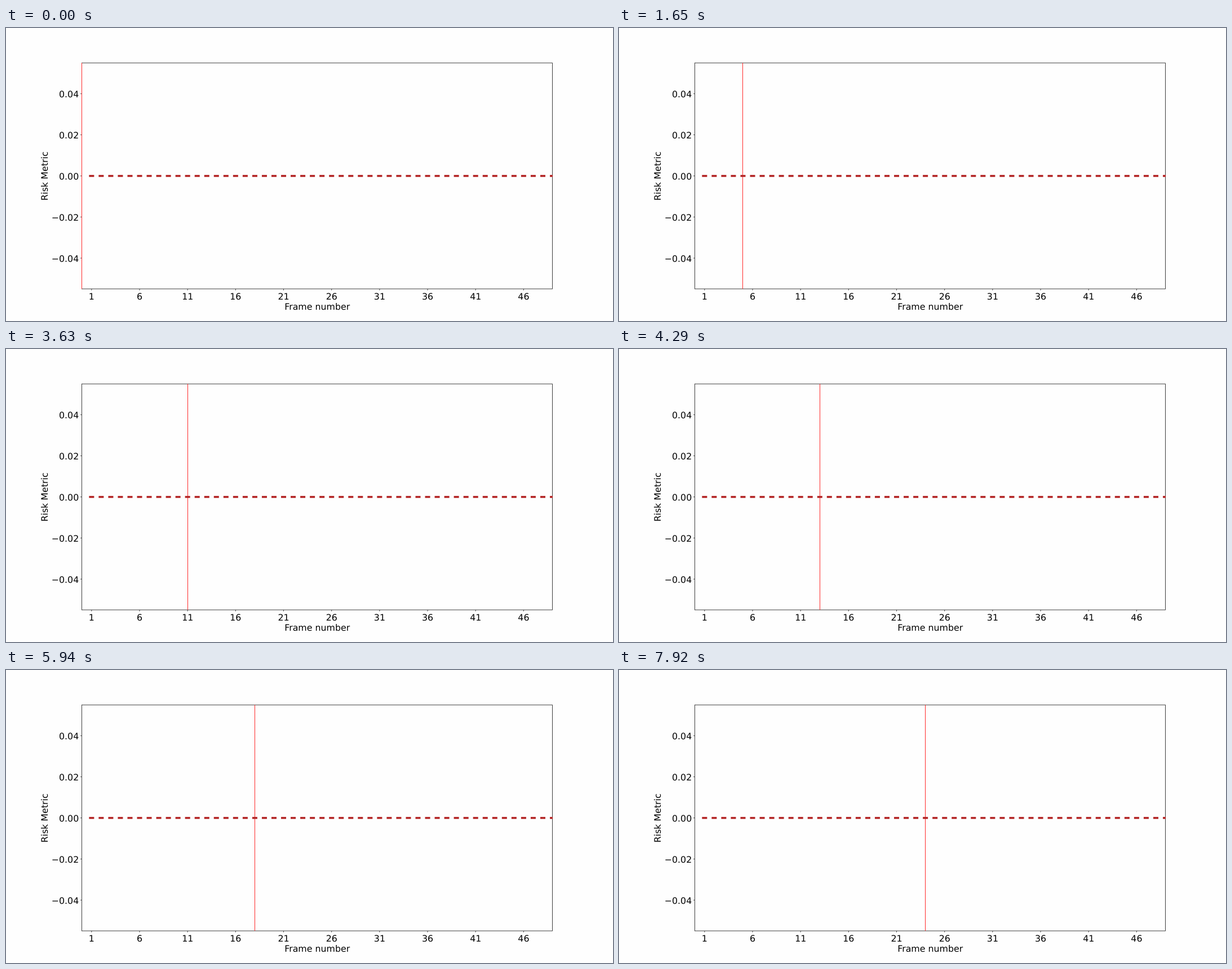
Write an HTML page with a canvas that moves like this. It is 1077 px wide and 520 px high and loops after 8000 ms.

```html
<!DOCTYPE html>
<html lang="en">
<head>
<meta charset="utf-8">
<style>
  html, body { margin: 0; width: 100%; height: 100%; overflow: hidden; background: #fefefe; }
  canvas { display: block; }
</style>
</head>
<body>
<canvas id="chart" width="1077" height="520"></canvas>
<script>
const ctx = document.getElementById('chart').getContext('2d');
const LEFT = 134.8, RIGHT = 969.5, TOP = 62, BOTTOM = 463;
const LOOP = 8000, STEP = 330;
const AXIS = '#1c1c1c';
const xAt = n => LEFT + n * (RIGHT - LEFT) / 49;
const yAt = v => (TOP + BOTTOM) / 2 - v * (BOTTOM - TOP) / 0.11;
const crisp = x => Math.floor(x) + 0.5;

function line(x1, y1, x2, y2, color, width) {
  ctx.strokeStyle = color;
  ctx.lineWidth = width;
  ctx.beginPath();
  ctx.moveTo(x1, y1);
  ctx.lineTo(x2, y2);
  ctx.stroke();
}

function label(text, x, y, align = 'center') {
  ctx.textAlign = align;
  ctx.fillText(text, x, y);
}

function drawAxes() {
  ctx.strokeStyle = AXIS;
  ctx.lineWidth = 0.85;
  ctx.strokeRect(134.5, TOP, 835, BOTTOM - TOP);
  ctx.fillStyle = '#000';
  ctx.font = '15.8px "DejaVu Sans", sans-serif';
  ctx.textRendering = 'geometricPrecision';
  for (let n = 1; n < 49; n += 5) {
    line(xAt(n), BOTTOM, xAt(n), BOTTOM + 2.6, AXIS, 0.8);
    label(n, xAt(n), 481.6);
  }
  for (let i = -2; i <= 2; i++) {
    const y = yAt(i * 0.02);
    line(132, y, 134.5, y, AXIS, 0.8);
    label((i * 0.02).toFixed(2).replace('-', '\u2212'), 129.2, y + 6.4, 'right');
  }
  label('Frame number', 552.2, 500);
  ctx.save();
  ctx.translate(74.1, 262.8);
  ctx.rotate(-Math.PI / 2);
  label('Risk Metric', 0, 0);
  ctx.restore();
}

function drawDashes() {
  ctx.fillStyle = '#b22222';
  for (let n = 1; n <= 49; n++) {
    const x = xAt(n) - 4.5;
    ctx.fillRect(x, 260.8, Math.min(9, 970 - x), 3.5);
  }
}

function render() {
  const step = Math.floor(performance.now() % LOOP / STEP);
  const x = crisp(xAt(step));
  ctx.fillStyle = '#fefefe';
  ctx.fillRect(0, 0, 1077, 520);
  drawAxes();
  line(x, TOP, x, BOTTOM, '#ff2828', 1);
  drawDashes();
  requestAnimationFrame(render);
}
render();
</script>
</body>
</html>
```
